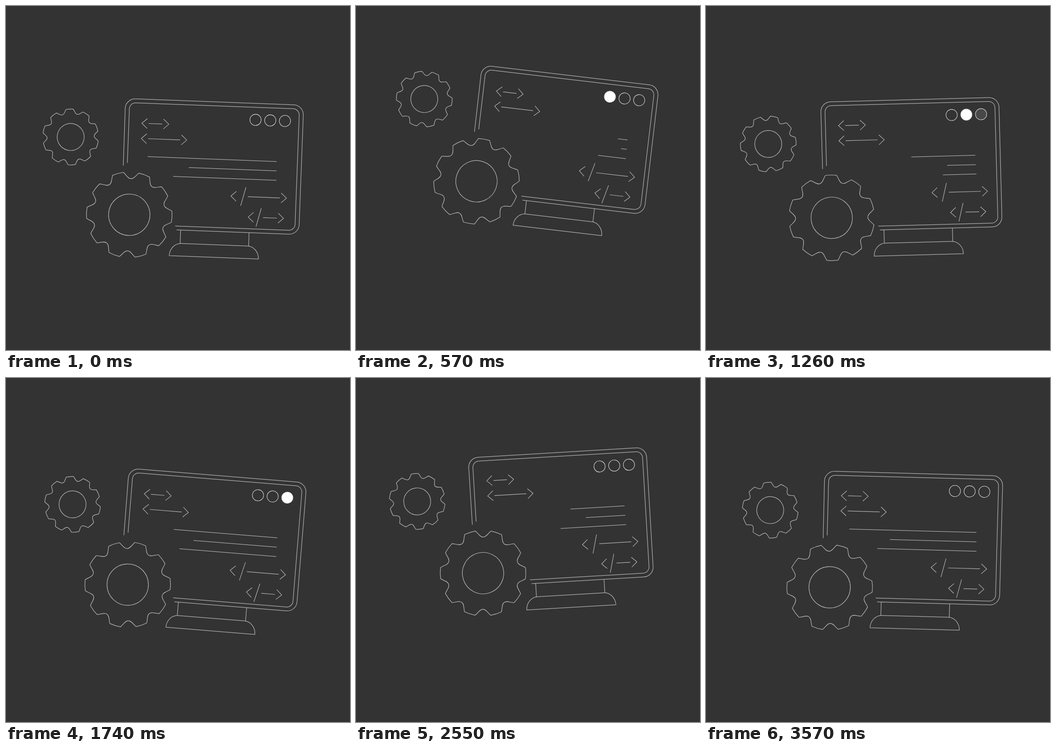
Write an HTML page with a canvas that moves like this. It is 748 px wide and 748 px high and loops after 3.6 s.

```html
<!DOCTYPE html>
<html lang="en">
<head>
<meta charset="utf-8">
<title>Coding monitor</title>
<style>
html, body { margin: 0; height: 100%; overflow: hidden; background: #333; }
canvas { display: block; }
</style>
</head>
<body>
<canvas id="stage" width="748" height="748"></canvas>
<script>
const LOOP = 3600, TAU = 2 * Math.PI, RAD = Math.PI / 180;
const ctx = document.getElementById('stage').getContext('2d');

const clamp = v => Math.min(1, Math.max(0, v));
const linear = u => u;
const sway = u => (1 - Math.cos(Math.PI * u)) / 2;

// Looping value that eases from each [time, value] key to the next.
function track(ease, ...keys) {
  return t => {
    const i = keys.findLastIndex(([time]) => time <= t);
    const [t0, v0] = keys.at(i);
    const [t1, v1] = keys[(i + 1) % keys.length];
    const wrap = v => (v + LOOP) % LOOP;
    return v0 + (v1 - v0) * ease(wrap(t - t0) / wrap(t1 - t0));
  };
}

// Only the turning points of the swing, in degrees.
const tilt = track(sway, [70, 2.9], [310, -2.2], [585, 6.8], [1020, -9.9], [1460, 4.7],
  [1700, 4.7], [2450, -2.8], [2980, -9.6], [3270, 8.4], [3475, 0.25]);

const hop = (t, peak, height) => height * Math.max(0, 1 - ((t - peak) / 390) ** 2);
const lift = t => hop(t, 600, 64.5) + hop(t, 2730, 50);

// Each dot lights up 550 ms after the one before it.
const glow = (t, i) => clamp(1.6 - Math.abs(t - 650 - 550 * i) / 327);

// Rows are erased and typed again at an even pace.
const rows = [
  { length: 281, shown: track(linear, [0, 1], [580, 0.06], [1800, 0.84], [2390, 0.33]) },
  { length: 191, shown: track(linear, [0, 1], [610, 0], [1010, 0], [1780, 1], [2400, 0.37]) },
  { length: 225, shown: track(linear, [0, 1], [783, 0], [1008, 0], [1790, 1], [2350, 1], [2900, 0]) }
];

const monitor = new Path2D(`
  M-119.9-22.6L-120.4-146.9a21.5 21.5 0 0 1 21.5-21.5H245.6a21.5 21.5 0 0 1 21.5 21.5V91.4a21.5 21.5 0 0 1-21.5 21.5H1.2
  M-111.3-28.9V-146.4a13.5 13.5 0 0 1 13.5-13.5H244.7a13.5 13.5 0 0 1 13.5 13.5V91a13.5 13.5 0 0 1-13.5 13.5H-2.1
  M10 113V142M158.9 113V142
  M-12.7 169.5A25 27.5 0 0 1 12.3 142H156.4A25 27.5 0 0 1 181.4 169.5Z`);

function stroke(color, width, path) {
  ctx.strokeStyle = color;
  ctx.lineWidth = width;
  path ? ctx.stroke(path) : ctx.stroke();
}

function polyline(...points) {
  points.forEach(([x, y], i) => i ? ctx.lineTo(x, y) : ctx.moveTo(x, y));
}

function tag(left, right, y, start, closing) {
  const bracket = (tip, side) =>
    polyline([tip + side * 11.7, y - 10.7], [tip, y], [tip + side * 11.7, y + 10.7]);
  ctx.beginPath();
  bracket(left, 1);
  bracket(right, -1);
  polyline([start, y], [right - 14.6, y]);
  if (closing) polyline([start - 4.8, y - 20.2], [start - 14.8, y + 20.2]);
  stroke('#b4b4b4', 1.2);
}

function gear(x, y, scale, degrees) {
  ctx.save();
  ctx.translate(x, y);
  ctx.rotate(degrees * RAD);
  ctx.scale(scale, scale);
  ctx.beginPath();
  for (let i = 0; i < 10; i++) {
    ctx.lineTo(-17, -91.5);
    ctx.bezierCurveTo(-10, -86, -7, -78.5, 0, -78.5);
    ctx.bezierCurveTo(7, -78.5, 10, -86, 17, -91.5);
    ctx.arc(0, 0, 93.1, -79.5 * RAD, -64.5 * RAD);
    ctx.rotate(TAU / 10);
  }
  ctx.closePath();
  ctx.moveTo(45, 0);
  ctx.arc(0, 0, 45, 0, TAU);
  stroke('#b8b8b8', 1.2 / scale);
  ctx.restore();
}

function draw(t) {
  ctx.setTransform(1, 0, 0, 1, 0, 0);
  ctx.fillStyle = '#333';
  ctx.fillRect(0, 0, 748, 748);
  ctx.translate(374, 374 - lift(t));
  ctx.rotate(tilt(t) * RAD);
  ctx.lineJoin = 'round';

  stroke('#b0b0b0', 1.25, monitor);
  tag(-83, -24.3, -116, -68.3);
  tag(-83, 15.9, -83, -68.3);
  tag(116.4, 237.4, 34.9, 153.2, true);
  tag(155.6, 232.6, 79.1, 188.2, true);

  rows.forEach(({ length, shown }, i) => {
    const right = 212.8 + 0.6 * i, y = -43.9 + 20.4 * i;
    ctx.beginPath();
    polyline([right - length * shown(t), y], [right, y]);
    stroke('#c4c4c4', 1);
  });

  for (let i = 0; i < 3; i++) {
    ctx.beginPath();
    ctx.arc(163.7 + 32 * i, -132.7, 12.2, 0, TAU);
    ctx.fillStyle = `rgba(255, 255, 255, ${glow(t, i)})`;
    ctx.fill();
    stroke('#dcdcdc', 1.1);
  }

  const spin = t / LOOP * 360;
  gear(-102.9, 83.9, 1, spin + 0.4);
  gear(-236.6, -80.3, 0.652, spin + 13.6);
}

const begin = performance.now();
function tick() {
  draw((performance.now() - begin) % LOOP);
  requestAnimationFrame(tick);
}
tick();
</script>
</body>
</html>
```
